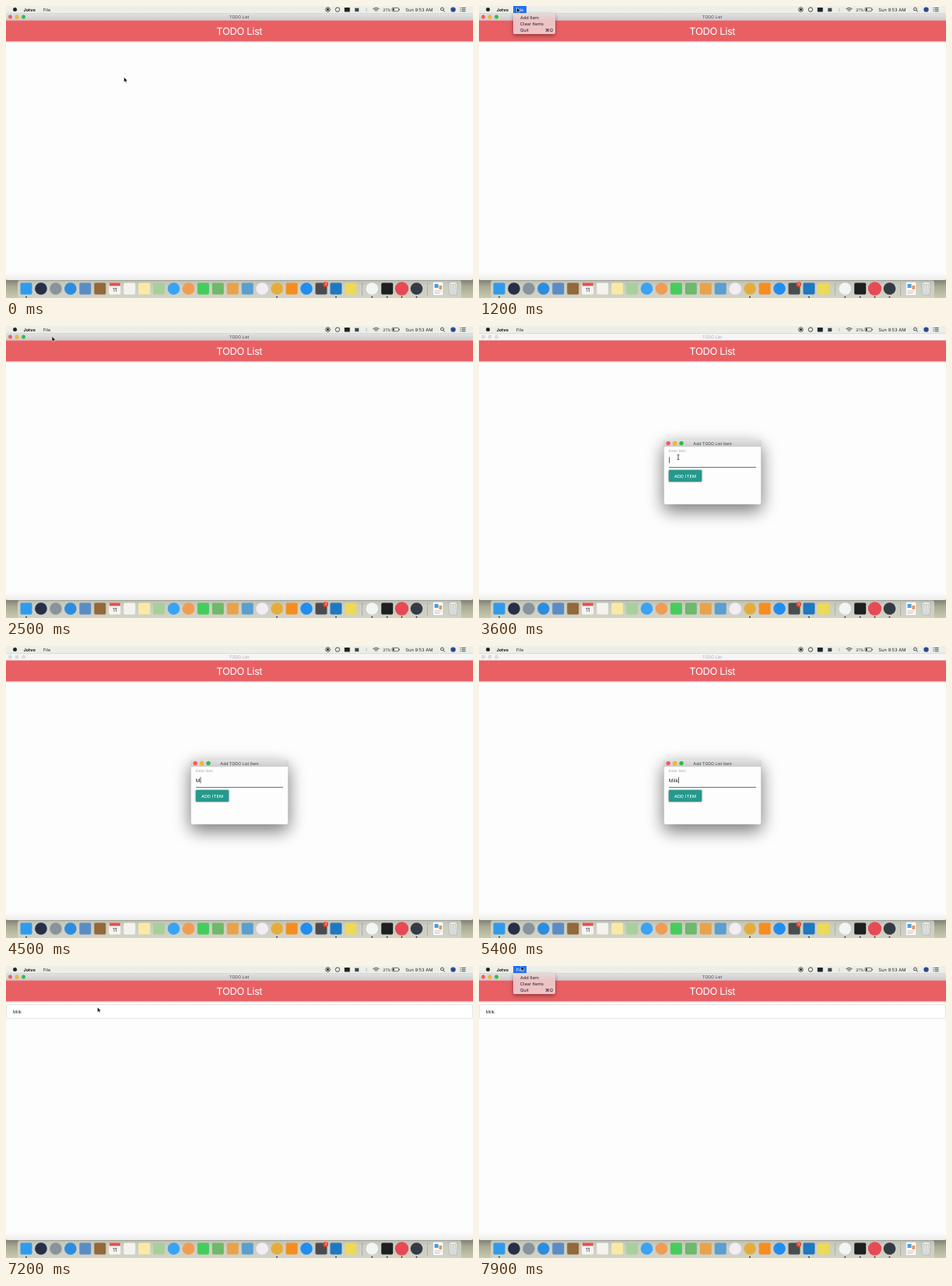
An HTML page that plays this animation: 600 by 375 pixels, repeating every 8000 ms.

```html
<!DOCTYPE html>
<html lang="en">
<head>
<meta charset="utf-8">
<title>TODO List</title>
<style>
html, body { margin: 0; width: 100%; height: 100%; overflow: hidden; background: #fff; }
svg { display: block; width: 600px; height: 375px; }
text { font-family: Inter, Roboto, sans-serif; white-space: pre; text-rendering: geometricPrecision; }
</style>
</head>
<body>
<svg id="stage" viewBox="0 0 600 375" xmlns="http://www.w3.org/2000/svg"></svg>
<script>
const LOOP = 8000;
const stage = document.getElementById('stage');

const attrs = o => Object.entries(o).map(([k, v]) => ` ${k}="${v}"`).join('');
const rect = (x, y, w, h, fill, o = {}) =>
  `<rect x="${x}" y="${y}" width="${w}" height="${h}" fill="${fill}"${attrs(o)}/>`;
const dot = (x, y, r, fill, o = {}) => `<circle cx="${x}" cy="${y}" r="${r}" fill="${fill}"${attrs(o)}/>`;
const path = (d, o = {}) => `<path d="${d}"${attrs({ fill: 'none', ...o })}/>`;
const text = (x, y, size, fill, str, o = {}) =>
  `<text x="${x}" y="${y}" font-size="${size}" fill="${fill}"${attrs(o)}>${str}</text>`;
const group = (id, body, o = {}) => `<g id="${id}"${attrs(o)}>${body}</g>`;
const grad = (id, ...stops) => `<linearGradient id="${id}" x2="0" y2="1">` +
  stops.map(([at, c, a = 1]) => `<stop offset="${at}" stop-color="${c}" stop-opacity="${a}"/>`).join('') +
  '</linearGradient>';
const mid = { 'text-anchor': 'middle' };
const lights = (xs, y, r) => ['#fb5b55', '#fbb62f', '#2bc23f']
  .map((c, i) => dot(xs[i], y, r, c, { stroke: '#0003', 'stroke-width': .3 })).join('');

const defs = '<defs>' +
  grad('bar', [0, '#e4e3e4'], [1, '#cdcccd']) +
  grad('drop', [0, '#000', .24], [1, '#000', 0]) +
  grad('foot', [0, '#fdfdfd'], [1, '#ececec']) +
  grad('desk', [0, '#7f8072'], [.35, '#a9aa94'], [1, '#c8c9ad']) +
  grad('dock', [0, '#bfc0b5'], [.3, '#cccdc1'], [1, '#d2d3c6']) +
  grad('glass', [0, '#e7d9da'], [.35, '#edc3c5'], [1, '#f0c2c4']) +
  '</defs>';

function desktop() {
  return rect(0, 346, 600, 6, '#7f8072') + rect(0, 352, 600, 23, 'url(#desk)') +
    path('M0 9H600V349.5Q600 352 597 352H3Q0 352 0 349.5Z', { fill: '#fdfdfd' }) +
    path('M0 342H600V349.5Q600 352 597 352H3Q0 352 0 349.5Z', { fill: 'url(#foot)' });
}

function mainWindow() {
  const quiet = rect(0, 9.5, 600, 9, '#f5f5f5') +
    [5.5, 14, 22.5].map(x => dot(x, 14, 2.2, '#dedede', { stroke: '#c8c8c8', 'stroke-width': .4 })).join('') +
    text(299.7, 16.1, 5.25, '#a8a8a8', 'TODO List', mid);
  return rect(0, 9, 600, 9.5, 'url(#bar)') + lights([5.5, 14, 22.5], 14, 2.4) +
    text(299.7, 16.1, 5.25, '#444', 'TODO List', mid) +
    group('quiet', quiet) +
    rect(0, 45, 600, 2.5, 'url(#drop)') +
    rect(0, 18.5, 600, 26.7, '#e96064') +
    text(299.8, 36.6, 12.9, '#fff', 'TODO List', { ...mid, 'letter-spacing': '-.35' }) +
    group('list', rect(.5, 49.5, 599, 17.8, '#fff', { rx: 1, stroke: '#dedede', 'stroke-width': .8 }) +
      text(8.8, 60.6, 5.8, '#222', 'Milk'));
}

function menuBar() {
  const ink = '#222', line = { stroke: ink, 'stroke-width': .8 };
  return rect(0, 0, 600, 9.2, '#eeeee8') + rect(0, 9.2, 600, .5, '#c6c6c2') +
    dot(11.5, 4.6, 2.5, ink) +
    text(22.5, 6.6, 5.5, '#111', 'Jotvo', { 'font-weight': 700 }) +
    group('hot', rect(44, 0, 17, 9.2, '#2273f2')) +
    text(48, 6.6, 5.5, '#222', 'File', { id: 'file' }) +
    dot(413.5, 4.6, 2.8, 'none', line) + dot(413.5, 4.6, 1.5, ink) +
    dot(426, 4.6, 2.7, 'none', line) +
    rect(434.8, 2, 7, 5.4, ink, { rx: .6 }) +
    rect(448.3, 2.6, 5, 4.6, '#3c4650') +
    rect(462.3, 2.4, 1.6, 4.6, '#cfcfcf') +
    path('M471.5 3.7Q475.5 .7 479.5 3.7M473 5.1Q475.5 3.2 478 5.1M474.4 6.4Q475.5 5.7 476.6 6.4', line) +
    text(484.3, 6.5, 5.1, ink, '21%') +
    rect(496, 2.4, 8.4, 4.4, 'none', { rx: .8, stroke: ink, 'stroke-width': .6 }) +
    rect(497, 3.3, 1.7, 2.6, ink) + rect(504.9, 3.8, .8, 1.6, ink) +
    text(513.3, 6.6, 5.75, ink, 'Sun 9:53 AM') +
    dot(560.4, 4, 1.9, 'none', line) + path('M561.8 5.4L564 7.5', line) +
    dot(574.5, 4.6, 3.2, '#2b4b8f') +
    path('M583.5 2.5h1M585.5 2.5h5M583.5 4.6h1M585.5 4.6h5M583.5 6.7h1M585.5 6.7h5', line);
}

function dropMenu() {
  return path('M44 9.2H98V34Q98 36 96 36H46Q44 36 44 34Z',
    { fill: 'url(#glass)', style: 'filter:drop-shadow(0 2px 2.5px #0006)' }) +
    group('pick', rect(44, 10.7, 54, 7.8, '#2273f2')) +
    text(53, 16.7, 5.6, '#222', 'Add Item', { id: 'add' }) +
    text(53, 24.6, 5.6, '#222', 'Clear Items') +
    text(53, 32.5, 5.6, '#222', 'Quit') +
    text(95, 32.5, 5.6, '#222', '⌘Q', { 'text-anchor': 'end' });
}

function dock() {
  const sq = (x, c, s = 15) => rect(x - s / 2, 363 - s / 2, s, s, c, { rx: 1.8 });
  const ci = (x, c, r = 7.8) => dot(x, 363, r, c);
  const apps = [
    [sq, '#2f9bea'], [ci, '#273047'], [ci, '#89939b'], [ci, '#2c8de0'], [sq, '#5c8cc4'],
    [sq, '#93683a'], [sq, '#f5f5f3'], [sq, '#f2f2ef'], [sq, '#f8e9a4'], [sq, '#a9cf9d'],
    [ci, '#39a3f5'], [ci, '#ef9d54'], [sq, '#45cd5b'], [sq, '#6fb86d'], [sq, '#e9a24c'],
    [sq, '#5a9fd0'], [ci, '#f3ecf2'], [ci, '#e3ad3d'], [sq, '#f58d1f'], [ci, '#218df0'],
    [sq, '#4a4c50'], [sq, '#1f78c2'], [sq, '#ecd956']
  ];
  let out = path('M15 375V355Q15 352.6 17.5 352.6H582.5Q585 352.6 585 355V375Z', { fill: 'url(#dock)' });
  apps.forEach(([shape, c], i) => out += shape(26 + i * 18.95, c));
  out += rect(132.8, 355.5, 14, 4, '#e4514b') +
    text(139.8, 366.9, 7, '#333', '11', mid) +
    dot(410.8, 357.5, 3.2, '#f0443c') + text(410.8, 359.3, 4.8, '#fff', '1', mid);
  out += [457.5, 541.5].map(x => rect(x - .3, 355, .6, 17, '#9b9c90')).join('');
  out += ci(470.3, '#f2f5f4') + sq(489.7, '#1d1f21') + ci(508.5, '#e64b55', 8.7) + ci(527.5, '#353b44');
  // documents stack and bin
  out += rect(548.5, 354.5, 13, 17, '#fafafa', { stroke: '#bbb', 'stroke-width': .4 }) +
    rect(550.5, 357, 5, 5, '#4d9fdc') + rect(556.5, 359, 3.5, 5, '#e39450') +
    path('M550.5 366h9M550.5 368.5h7', { stroke: '#aaa', 'stroke-width': .7 }) +
    path('M568.5 356H580.3L578.8 371H570Z', { fill: '#e3e5e2', stroke: '#a3a6a3', 'stroke-width': .6 }) +
    path('M571.3 358L572.2 369.5M574.4 358V369.5M577.5 358L576.6 369.5', { stroke: '#bfc2be', 'stroke-width': .7 }) +
    `<ellipse cx="574.4" cy="356" rx="6" ry="1.4" fill="#f4f4f2" stroke="#a3a6a3" stroke-width=".6"/>`;
  return out + [26, 348, 424, 470.3, 489.7, 508.5, 527.5].map(x => dot(x, 373.7, .9, '#222')).join('');
}

function dialog() {
  return rect(237.5, 146, 125, 83, '#fdfdfd', { rx: 2.5, style: 'filter:drop-shadow(0 8px 11px #0006) drop-shadow(0 0 .5px #0007)' }) +
    path('M237.5 155V148.5Q237.5 146 240 146H360Q362.5 146 362.5 148.5V155Z', { fill: 'url(#bar)' }) +
    lights([243.2, 251.6, 260], 150.6, 2.6) +
    text(300, 152.6, 5.3, '#444', 'Add TODO List Item', mid) +
    text(243.8, 161.9, 4.6, '#a2a2a2', 'Enter Item') +
    text(243.8, 174.9, 6.3, '#222', '', { id: 'typed' }) +
    rect(244, 168.3, .7, 8, '#222', { id: 'caret' }) +
    rect(244, 181.1, 112, .9, '#55686c') +
    rect(243.8, 185, 42.4, 15, '#25998d', { rx: 1, style: 'filter:drop-shadow(0 .8px .9px #0007)' }) +
    text(265, 194.5, 5.4, '#fff', 'ADD ITEM', { ...mid, 'letter-spacing': '.25', 'font-weight': 500 });
}

const arrow = path('M-.4 0V6.2L1.1 4.9L2.1 7.1L3.1 6.6L2.2 4.6H4.1Z',
  { fill: '#000', stroke: '#fff', 'stroke-width': .5 });
const beam = path('M-1.4 -3.2Q0 -3.2 0 -2.4Q0 -3.2 1.4 -3.2M0 -2.4V2.4M-1.4 3.2Q0 3.2 0 2.4Q0 3.2 1.4 3.2',
  { stroke: '#222', 'stroke-width': .8 });

stage.innerHTML = defs + desktop() + mainWindow() + dock() + menuBar() +
  group('menu', dropMenu()) + group('dialog', dialog()) +
  group('cursor', group('arrow', arrow) + group('beam', beam));

const el = {};
stage.querySelectorAll('[id]').forEach(e => el[e.id] = e);

const clamp = v => Math.max(0, Math.min(1, v));
const ease = v => v * v * (3 - 2 * v);
const within = (t, a, b) => t >= a && t < b;
const show = (e, on) => e.setAttribute('visibility', on ? 'inherit' : 'hidden');

const OPEN = 2700, CLOSE = 6200;
const keys = [4500, 4800, 5100, 5400];
// pointer stops: time, x, y
const stops = [
  [0, 152, 91.5], [100, 152, 91.5], [950, 49, 2], [1250, 49, 2], [1550, 59.5, 13.5],
  [3200, 59.5, 13.5], [3550, 256, 168.5], [6700, 256, 168.5], [7500, 54.5, 0], [LOOP, 54.5, 0]
];

function pointer(t) {
  const i = stops.findIndex((s, n) => n && t <= s[0]);
  const [t0, x0, y0] = stops[i - 1], [t1, x1, y1] = stops[i];
  const k = ease((t - t0) / (t1 - t0));
  return [x0 + (x1 - x0) * k, y0 + (y1 - y0) * k];
}

function draw(t) {
  const menu = within(t, 1000, 2000) || t >= 7600;
  const pick = within(t, 1480, 2000);
  const open = within(t, OPEN, CLOSE);
  show(el.menu, menu);
  show(el.hot, menu);
  el.file.setAttribute('fill', menu ? '#fff' : '#222');
  show(el.pick, pick);
  el.add.setAttribute('fill', pick ? '#fff' : '#222');
  show(el.quiet, open);
  show(el.list, t >= CLOSE);

  const k = ease(clamp((t - OPEN + 60) / 300)), s = .9 + .1 * k;
  show(el.dialog, open);
  el.dialog.setAttribute('opacity', k);
  el.dialog.setAttribute('transform', `translate(300 187.5) scale(${s}) translate(-300 -187.5)`);

  const count = keys.filter(at => t >= at).length;
  el.typed.textContent = 'Milk'.slice(0, count);
  const since = Math.max(...[OPEN, 3500, ...keys].filter(at => t >= at), 0);
  show(el.caret, Math.floor((t - since) / 500) % 2 === 0);
  el.caret.setAttribute('x', 244 + (count ? el.typed.getComputedTextLength() : 0));

  const [x, y] = pointer(t);
  const overField = open && within(x, 244, 356) && within(y, 163, 182);
  show(el.cursor, !within(t, keys[0], 6700));
  el.cursor.setAttribute('transform', `translate(${x} ${y})`);
  show(el.arrow, !overField);
  show(el.beam, overField);
}

const start = performance.now();
function tick() {
  draw((performance.now() - start) % LOOP);
  requestAnimationFrame(tick);
}
tick();
</script>
</body>
</html>
```
